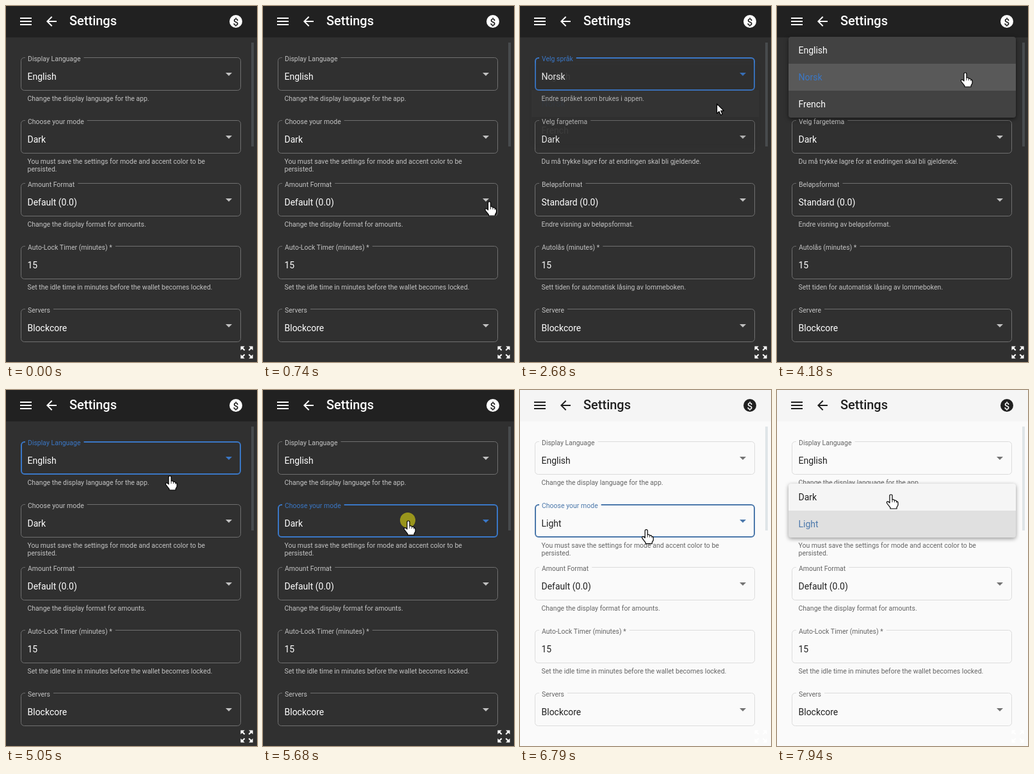
Write an HTML page with a canvas that moves like this. It is 392 px wide and 555 px high and loops after 8000 ms.

```html
<!DOCTYPE html>
<html lang="en">
<head>
<meta charset="utf-8">
<title>Settings</title>
<style>
html, body { margin: 0; width: 100%; height: 100%; overflow: hidden; background: #303030; }
canvas { display: block; width: 392px; height: 555px; }
</style>
</head>
<body>
<canvas id="stage" width="392" height="555"></canvas>
<script>
const ctx = document.getElementById('stage').getContext('2d');
const LOOP = 8000, STEP = 70;
const FIELD = { x: 23, y: 80, w: 344, h: 52, gap: 98 };
const ROW = 42;

const THEMES = {
  dark: {
    bg: '#303030', bar: '#212121', ink: '#fff', soft: '#c3c3c3', line: '#707070',
    blue: '#3a77c6', thumb: '#484b4d', panel: '#424242', tint: '255,255,255',
    hint: '#c3c3c3', caret: '#c1c1c1', shadow: 'rgba(0,0,0,.55)'
  },
  light: {
    bg: '#fafafa', bar: '#f5f5f5', ink: 'rgba(0,0,0,.87)', soft: 'rgba(0,0,0,.6)', line: '#dcdcdc',
    blue: '#4b78ab', thumb: '#dfe5e8', panel: '#fff', tint: '0,0,0',
    hint: 'rgba(0,0,0,.6)', caret: '#737373', shadow: 'rgba(0,0,0,.4)'
  }
};

const TEXTS = {
  en: [
    ['Display Language', 'English', 'Change the display language for the app.'],
    ['Choose your mode', '', 'You must save the settings for mode and accent color to be', 'persisted.'],
    ['Amount Format', 'Default (0.0)', 'Change the display format for amounts.'],
    ['Auto-Lock Timer (minutes) *', '15', 'Set the idle time in minutes before the wallet becomes locked.'],
    ['Servers', 'Blockcore']
  ],
  nb: [
    ['Velg språk', 'Norsk', 'Endre språket som brukes i appen.'],
    ['Velg fargetema', '', 'Du må trykke lagre for at endringen skal bli gjeldende.'],
    ['Beløpsformat', 'Standard (0.0)', 'Endre visning av beløpsformat.'],
    ['Autolås (minutes) *', '15', 'Sett tiden for automatisk låsing av lommeboken.'],
    ['Servere', 'Blockcore']
  ]
};

const LANGS = ['English', 'Norsk', 'French'], MODES = ['Dark', 'Light'];
const PANELS = [
  { open: 1580, close: 2610, y: 89, items: LANGS, from: 0, to: 1, tap: 2340 },
  { open: 3830, close: 4850, y: 48, items: LANGS, from: 1, to: 0, tap: 4710 },
  { open: 5820, close: 6440, y: 188, items: MODES, from: 0, to: 1, tap: 6230 },
  { open: 7530, close: LOOP, y: 146, items: MODES, from: 1, to: 0, tap: LOOP }
];

// Pointer legs: start, end, target x, target y.
const START = [358, 496];
const LEGS = [
  [390, 1160, 347, 112], [1920, 2270, 307, 152], [3020, 3360, 300, 117],
  [4110, 4180, 293, 103], [4250, 4430, 272, 69], [4910, 5050, 255, 133],
  [5120, 5400, 226, 203], [5890, 6160, 214, 247], [6580, 6910, 190, 206],
  [7660, 7940, 177, 162]
];
const CLICKS = [[1440, 1720], [2340, 2480], [3630, 3830], [4640, 4780],
  [5680, 5820], [6230, 6370], [7390, 7530]];
const HOVERS = [[0, 1020, 1440], [1, 5330, 5680]];

const within = (t, a, b) => t >= a && t < b;
const stepsSince = (t, start) => Math.floor((t - start) / STEP);
const smooth = p => p * p * (3 - 2 * p);

function text(str, x, y, size, color, weight = 400) {
  ctx.font = `${weight} ${size}px Roboto, sans-serif`;
  ctx.fillStyle = color;
  ctx.fillText(str, x, y);
}

function fillPath(d, color) {
  ctx.fillStyle = color;
  ctx.fill(new Path2D(d));
}

function disc(x, y, r, color) {
  ctx.fillStyle = color;
  ctx.beginPath();
  ctx.arc(x, y, r, 0, 7);
  ctx.fill();
}

function at(x, y, draw) {
  ctx.save();
  ctx.translate(x, y);
  draw();
  ctx.restore();
}

function pointerAt(t) {
  let [x, y] = START;
  for (const [a, b, tx, ty] of LEGS) {
    if (t < a) break;
    const count = Math.round((b - a) / STEP) + 1;
    const p = smooth(Math.min(1, (stepsSince(t, a) + 1) / count));
    x += (tx - x) * p;
    y += (ty - y) * p;
  }
  return { x, y };
}

function drawHeader(c) {
  ctx.fillStyle = c.bar;
  ctx.fillRect(0, 0, 392, 49);
  ctx.fillStyle = c.ink;
  for (const y of [18, 23, 28]) ctx.fillRect(22, y, 18, 2);
  at(59, 12, () => fillPath('M20 11H7.8l5.6-5.6L12 4l-8 8 8 8 1.4-1.4L7.8 13H20z', c.ink));
  text('Settings', 99, 30, 20, c.ink, 500);
  disc(359, 24, 10, c.ink);
  ctx.textAlign = 'center';
  text('$', 359, 29.5, 15.5, c.bar, 500);
  ctx.textAlign = 'left';
}

function drawOutline(y, labelWidth, color, width) {
  const { x, w, h } = FIELD, inset = width / 2, r = 5;
  const left = x + inset, right = x + w - inset, top = y + inset, bottom = y + h - inset;
  ctx.strokeStyle = color;
  ctx.lineWidth = width;
  ctx.beginPath();
  ctx.moveTo(34 + labelWidth + 5, top);
  ctx.arcTo(right, top, right, bottom, r);
  ctx.arcTo(right, bottom, left, bottom, r);
  ctx.arcTo(left, bottom, left, top, r);
  ctx.arcTo(left, top, right, top, r);
  ctx.lineTo(30, top);
  ctx.stroke();
}

function drawField(index, content, c, focused, hover) {
  const [label, value, ...hints] = content;
  const y = FIELD.y + index * FIELD.gap;
  text(label, 34, y + 6, 10.5, focused ? c.blue : c.soft);
  const labelWidth = ctx.measureText(label).width;
  drawOutline(y, labelWidth, focused ? c.blue : c.line, focused ? 2 : 1);
  if (hover > 0 && !focused) {
    ctx.globalAlpha = hover;
    drawOutline(y, labelWidth, c.ink, 2);
    ctx.globalAlpha = 1;
  }
  text(value, 33.5, y + 35, 14, c.ink);
  hints.forEach((line, i) => text(line, 33.5, y + 68 + i * 12, 10.5, c.hint));
  if (index !== 3) {
    at(348, y + 24, () => fillPath('M-5 0H5L0 5z', focused ? c.blue : c.caret));
  }
}

function drawPanel(panel, t, c, pointer) {
  if (!within(t, panel.open, panel.close + 2 * STEP)) return;
  const closing = t >= panel.close;
  const k = Math.min(2, stepsSince(t, panel.open));
  const alpha = closing ? [0.5, 0.07][stepsSince(t, panel.close)] : [0.35, 0.85, 1][k];
  const scale = [0.86, 0.97, 1][k];
  const height = panel.items.length * ROW, width = 355;
  const selected = closing ? panel.to : panel.from;
  ctx.save();
  ctx.globalAlpha = alpha;
  ctx.translate(18, panel.y);
  ctx.scale(1, scale);
  ctx.beginPath();
  ctx.roundRect(0, 0, width, height, 4);
  ctx.shadowColor = c.shadow;
  ctx.shadowBlur = 6;
  ctx.shadowOffsetY = 2;
  ctx.fillStyle = c.panel;
  ctx.fill();
  ctx.shadowColor = 'transparent';
  ctx.clip();
  panel.items.forEach((item, i) => {
    const top = i * ROW;
    const py = pointer.y - panel.y - top;
    const over = within(py, 0, ROW);
    if (i === selected || over) {
      ctx.fillStyle = `rgba(${c.tint},${i === selected ? 0.12 : 0.04})`;
      ctx.fillRect(0, top, width, ROW);
    }
    if (over && t >= panel.tap) {
      ctx.save();
      ctx.beginPath();
      ctx.rect(0, top, width, ROW);
      ctx.clip();
      disc(pointer.x - 18, pointer.y - panel.y, 40 + 104 * stepsSince(t, panel.tap), `rgba(${c.tint},.1)`);
      ctx.restore();
    }
    text(item, 15.5, top + 26, 14, i === selected ? c.blue : c.ink);
  });
  ctx.restore();
}

function drawExpandIcon() {
  at(376, 540, () => {
    ctx.scale(1.06, 1.06);
    for (let i = 0; i < 4; i++) {
      fillPath('M3-9l2.3 2.3-2.9 2.9 1.4 1.4L6.7-5.3 9-3V-9z', '#fff');
      ctx.rotate(Math.PI / 2);
    }
  });
}

const HAND = new Path2D('M-1 3q0-2 2-2t2 2v6q3-.8 3.4 1.2 3-.6 3.3 1.4 2.3 0 2.3 2.6v3.3l-2 3.5v2H0v-1.6l-5-6.4q-1.4-2.6.6-3.2 1.6-.2 3.4 2.2z');
const ARROW = new Path2D('M.5 .5v15l3.5-3 2.5 5.4 2.6-1.1L6.7 11.4h4.6z');

function drawPointer({ x, y }, hand) {
  at(x, y, () => {
    const shape = hand ? HAND : ARROW;
    ctx.lineJoin = 'round';
    ctx.lineWidth = 1.2;
    ctx.fillStyle = '#fff';
    ctx.strokeStyle = '#000';
    ctx.fill(shape);
    ctx.stroke(shape);
    if (hand) {
      ctx.lineWidth = 0.8;
      ctx.stroke(new Path2D('M3 9v4M6.4 10.2v3M9.6 11.8v2'));
    }
  });
}

function isHand({ x, y }, t) {
  const inPanel = PANELS.some(p => within(t, p.open, p.close) &&
    within(y, p.y, p.y + p.items.length * ROW));
  const offset = (y - FIELD.y) % FIELD.gap;
  return inPanel || (x > FIELD.x && x < FIELD.x + FIELD.w && within(offset, 0, FIELD.h + 2));
}

function draw(t) {
  const isLight = t >= 6440;
  const c = isLight ? THEMES.light : THEMES.dark;
  const content = within(t, 2610, 4850) ? TEXTS.nb : TEXTS.en;
  const focus = t < 1440 ? -1 : t < 5680 ? 0 : 1;
  const pointer = pointerAt(t);

  ctx.fillStyle = c.bg;
  ctx.fillRect(0, 0, 392, 555);
  drawHeader(c);
  ctx.fillStyle = c.thumb;
  ctx.fillRect(383, 57, 4, 162);

  content.forEach((row, i) => {
    const hover = HOVERS.find(([field, a, b]) => field === i && within(t, a, b));
    const strength = hover ? Math.min(1, (stepsSince(t, hover[1]) + 1) / 5) : 0;
    const filled = i === 1 ? [row[0], isLight ? 'Light' : 'Dark', ...row.slice(2)] : row;
    drawField(i, filled, c, focus === i, strength);
  });

  PANELS.forEach(panel => drawPanel(panel, t, c, pointer));
  drawExpandIcon();
  if (CLICKS.some(([a, b]) => within(t, a, b))) {
    disc(pointer.x, pointer.y, 12, 'rgba(206,200,20,.67)');
  }
  if (t >= 390) drawPointer(pointer, isHand(pointer, t));
}

const began = performance.now();
function tick() {
  draw((performance.now() - began) % LOOP);
  requestAnimationFrame(tick);
}
tick();
</script>
</body>
</html>
```
